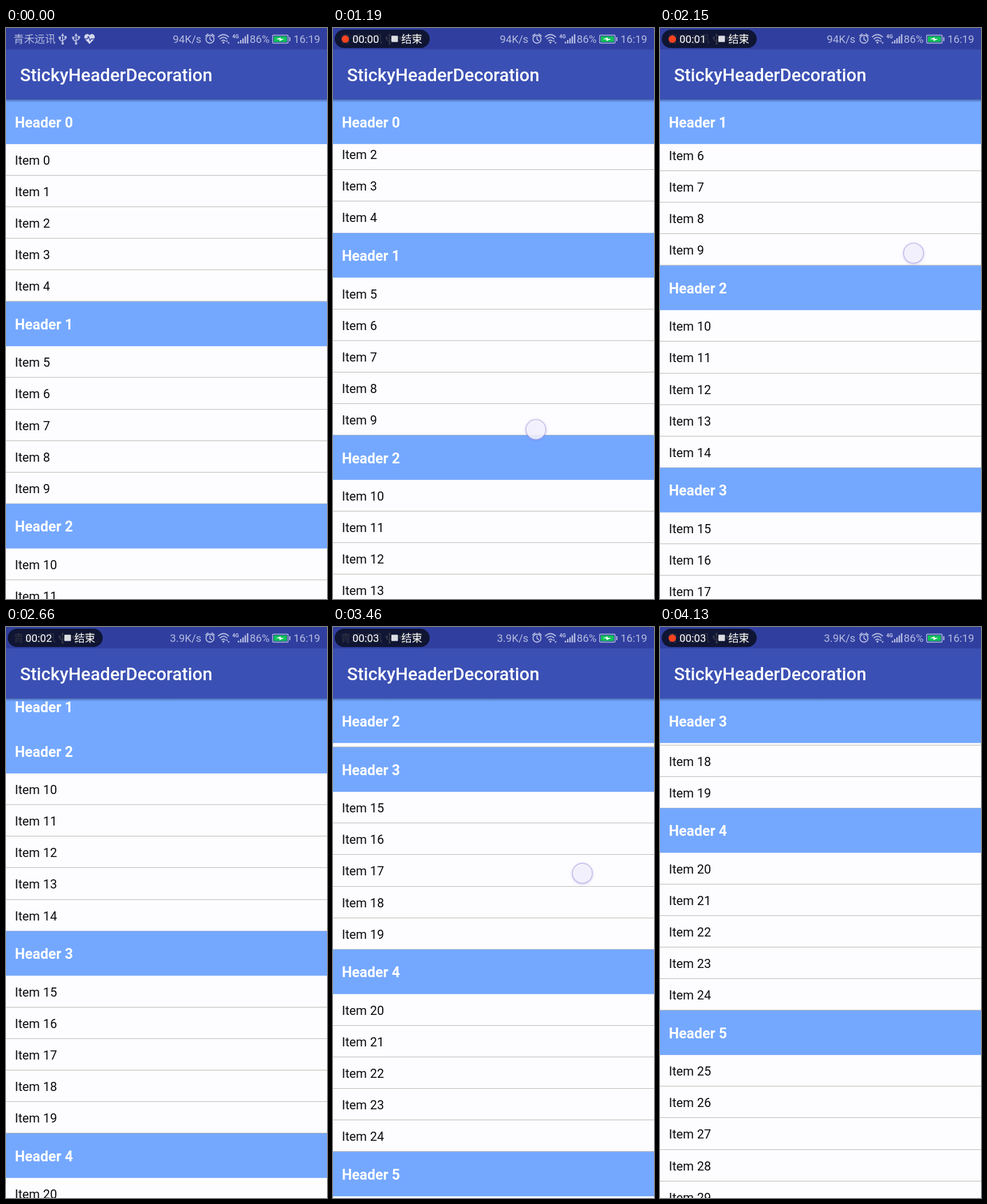
An HTML page for the animation above (4.17 s loop, 561 by 998 pixels).

```html
<!DOCTYPE html>
<html lang="en">
<head>
<meta charset="utf-8">
<title>Sticky header list</title>
<style>
  html, body { margin: 0; width: 100%; height: 100%; overflow: hidden; background: #fdfcff; }
  svg { display: block; width: 561px; height: 998px; font-family: Roboto, sans-serif; }
  .header { font-size: 24.9px; font-weight: 700; fill: #fff; }
  .item { font-size: 21.8px; fill: #0c0c0e; }
  .title { font-size: 31px; font-weight: 500; fill: #fff; }
  .status { font-size: 18.7px; fill: #b5bbdf; }
  .cjk { font-family: "Noto Sans CJK SC", "Noto Sans CJK", sans-serif; }
  .line { fill: none; stroke: #b5bbdf; stroke-width: 1.8; stroke-linecap: round; }
  .divider { fill: #bbbab4; shape-rendering: crispEdges; }
  #finger { filter: drop-shadow(0 1px 2px rgba(130, 120, 215, .5)); }
</style>
</head>
<body>
<svg viewBox="0 0 561 998">
  <defs>
    <linearGradient id="shade" x2="0" y2="1">
      <stop stop-color="#26356f" stop-opacity=".5"/>
      <stop offset="1" stop-color="#26356f" stop-opacity="0"/>
    </linearGradient>
    <g id="usb">
      <path class="line" d="M0-7V7M-5-2V1L0 5M5-3V0L0 3"/>
      <path fill="#b5bbdf" d="M0-10L3-5H-3ZM-7-4h4v4h-4ZM3-5h4v4H3Z"/>
      <circle cy="8" r="2.2" fill="#b5bbdf"/>
    </g>
  </defs>
  <rect width="561" height="998" fill="#fdfcff"/>
  <g id="list"></g>
  <g id="sticky">
    <rect width="561" height="78" fill="#74a8ff"/>
    <text id="stickyText" class="header" x="15.5" y="48.75"></text>
  </g>
  <circle id="finger" r="17.3" fill="#fcfbff" fill-opacity=".82" stroke="#a9a2de" stroke-opacity=".6" stroke-width="1.6"/>

  <rect y="125" width="561" height="5" fill="url(#shade)"/>
  <rect width="561" height="125" fill="#3b50b4"/>
  <rect width="561" height="37.5" fill="#303f9f"/>
  <text class="title" x="24.5" y="93.3">StickyHeaderDecoration</text>

  <text class="status cjk" x="13" y="26" style="font-size:18.4px">青禾远讯</text>
  <use href="#usb" x="99" y="19"/>
  <use href="#usb" x="122.5" y="19"/>
  <path fill="#d3d7ec" d="M146 28L138 19.5C134 13 142 7 146 13C150 7 158 13 154 19.5Z"/>
  <path d="M137 19h5l2-4 3 7 2-3h6" fill="none" stroke="#303f9f" stroke-width="1.5"/>

  <text id="speed" class="status" x="341.5" y="26" text-anchor="end"></text>
  <g class="line">
    <circle cx="356.5" cy="19.5" r="7"/>
    <path d="M356.5 15.5V20L359.5 22M349 14l4-3.5M364 14l-4-3.5"/>
    <path d="M371 15.5Q380 7.5 389 15.5M374 19Q380 13.5 386 19M377 22.5Q380 20 383 22.5"/>
  </g>
  <circle cx="380" cy="25.5" r="1.7" fill="#b5bbdf"/>
  <path fill="#b5bbdf" d="M384 24l2-3 2 3ZM387 25h4l-2 3Z"/>
  <text x="395.5" y="17.5" fill="#c3c8e6" font-size="9" font-weight="700">4G</text>
  <path fill="#b5bbdf" d="M405 24h2.500v3H405ZM409 21h2.500v6H409ZM413 18h2.500v9H413ZM417 14.500h2.500V27H417ZM421 11h2.500v16H421Z"/>
  <text class="status" x="426" y="26">86%</text>
  <rect x="466" y="12.5" width="27" height="14" rx="1.5" fill="none" stroke="#b5bbdf" stroke-width="1.5"/>
  <rect x="468" y="14.5" width="23" height="10" fill="#10c25a"/>
  <path fill="#fff" d="M472 19.5l8-3v2.500h6l-8 4v-3Z"/>
  <rect x="495" y="16" width="2" height="7" fill="#b5bbdf"/>
  <text class="status" x="502.5" y="26">16:19</text>

  <g id="pill">
    <rect x="3" y="3" width="166" height="32" rx="16" fill="#05070f" fill-opacity=".75"/>
    <circle id="dot" cx="21.5" cy="19.5" r="6.5" fill="#fa4320"/>
    <text id="clock" x="34" y="26" font-size="18.7" fill="#fff"></text>
    <rect x="102" y="13.5" width="11.5" height="11" rx="1" fill="#dcdde2"/>
    <text class="cjk" x="119.5" y="26" font-size="18.2" fill="#fff">结束</text>
  </g>
</svg>
<script>
const LOOP = 4170, TOP = 124.75, HEADER = 77.97, ITEM = 55.1, GROUP = HEADER + 5 * ITEM;
const $ = id => document.getElementById(id);

// Each key is [time, value, ...]
const scrollKeys = [[560, 0], [800, 22], [1190, 119.6], [1710, 262.8], [2150, 416.1], [2360, 530],
  [2660, 653.4], [3040, 738], [3200, 830], [3460, 974.5], [3700, 1095], [4130, 1222]];
const swipes = [
  [[520, 322, 832], [800, 333, 804], [1190, 354.5, 702], [1710, 391.7, 562], [2150, 443, 394], [2360, 466, 296]],
  [[3000, 402, 684], [3200, 413, 580], [3460, 435.7, 431], [3700, 464, 306]]
];

// Smooth curve through the keys, held at both ends
function curve(keys, t, k = 1) {
  const last = keys.length - 1;
  if (t <= keys[0][0]) return keys[0][k];
  if (t >= keys[last][0]) return keys[last][k];
  const i = keys.findIndex(key => key[0] > t) - 1;
  const slope = j => {
    const a = keys[Math.max(j - 1, 0)], b = keys[Math.min(j + 1, last)];
    return (b[k] - a[k]) / (b[0] - a[0]);
  };
  const a = keys[i], b = keys[i + 1], d = b[0] - a[0], u = (t - a[0]) / d, v = 1 - u;
  return v * v * ((1 + 2 * u) * a[k] + u * d * slope(i))
       + u * u * ((3 - 2 * u) * b[k] - v * d * slope(i + 1));
}

function buildList() {
  let out = "";
  for (let g = 0; g < 7; g++) {
    const y = TOP + g * GROUP;
    for (let i = 0; i < 5; i++) {
      const top = y + HEADER + i * ITEM;
      out += `<text class="item" x="15.5" y="${top + 36.2}">Item ${g * 5 + i}</text>
        <rect class="divider" y="${top + ITEM - 0.8}" width="561" height="1"/>`;
    }
    out += `<rect y="${y}" width="561" height="${HEADER}" fill="#74a8ff"/>
      <text class="header" x="15.5" y="${y + 48.75}">Header ${g}</text>`;
  }
  $("list").innerHTML = out;
}

function draw() {
  const t = performance.now() % LOOP;
  const scroll = curve(scrollKeys, t);
  $("list").setAttribute("transform", `translate(0 ${-scroll})`);

  // The next header pushes the pinned one out
  const group = Math.floor(scroll / GROUP);
  const push = Math.min(0, (group + 1) * GROUP - scroll - HEADER);
  $("sticky").setAttribute("transform", `translate(0 ${TOP + push})`);
  $("stickyText").textContent = "Header " + group;

  const swipe = swipes.find(s => t >= s[0][0] && t <= s[s.length - 1][0]);
  $("finger").style.display = swipe ? "" : "none";
  if (swipe) {
    $("finger").setAttribute("cx", curve(swipe, t, 1));
    $("finger").setAttribute("cy", curve(swipe, t, 2));
  }

  // Recorder seconds tick at 1230 ms, 2230 ms, ...; the dot lights in each second half
  const clock = Math.max(0, t - 230);
  $("clock").textContent = "00:0" + Math.floor(clock / 1000);
  $("dot").style.display = clock % 1000 >= 500 ? "" : "none";
  $("pill").style.opacity = Math.min(1, Math.max(0, (t - 40) / 240));
  $("speed").textContent = t < 2400 ? "94K/s" : "3.9K/s";
  requestAnimationFrame(draw);
}

buildList();
draw();
</script>
</body>
</html>
```
